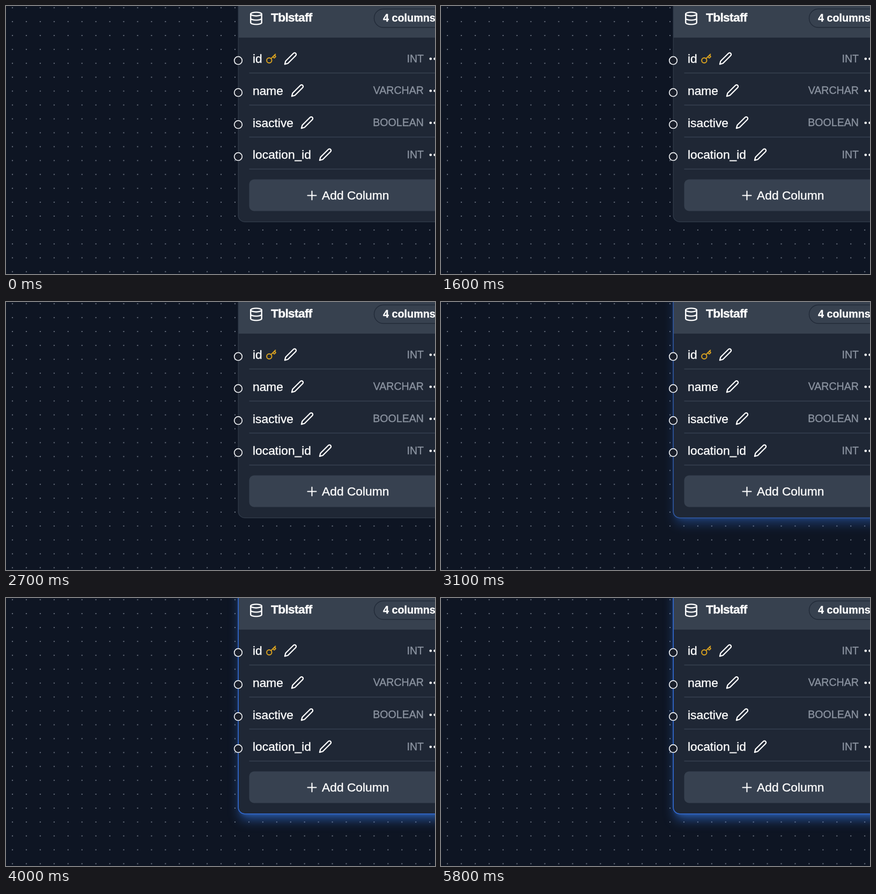
These frames come from a looping animation (800 by 500 pixels, 5900 ms). An HTML page:

```html
<!DOCTYPE html>
<html lang="en">
<head>
<meta charset="utf-8">
<title>Table card</title>
<style>
  html, body { margin: 0; width: 100%; height: 100%; overflow: hidden; background: #0e1523; }
  svg { display: block; }
  text { font: 22.8px "Liberation Sans", Arial, sans-serif; fill: #fff; stroke: #fff; stroke-width: .35; }
  .title { font-weight: 700; letter-spacing: -.7px; }
  .count { font-weight: 700; font-size: 19.8px; }
  .type { font-size: 19.6px; fill: #8b93a0; stroke: #8b93a0; text-anchor: end; }
  .icon { fill: none; stroke: #fff; stroke-width: 2.1; stroke-linecap: round; stroke-linejoin: round; }
  .line { stroke: #364050; stroke-width: 1.3; }
  .far { filter: blur(10.5px); }
  .near { filter: blur(4.2px); }
</style>
</head>
<body>
<svg width="800" height="500" viewBox="0 0 800 500">
  <defs>
    <pattern id="dots" x="-1" y="-9.8" width="25.94" height="25.92" patternUnits="userSpaceOnUse">
      <circle cx="13" cy="13" r="1.15" fill="#747c8a"/>
    </pattern>
    <clipPath id="clip"><rect x="433.2" y="-80" width="500" height="482.7" rx="12"/></clipPath>
    <path id="pencil" d="M17 3a2.85 2.83 0 1 1 4 4L7.5 20.5 2 22l1.5-5.5Z"/>
  </defs>
  <rect width="800" height="500" fill="url(#dots)"/>

  <g id="glow" fill="#3b82f6" opacity="0">
    <rect class="far" fill-opacity=".55" x="437" y="-62" width="492" height="475" rx="9"/>
    <rect class="near" fill-opacity=".5" x="438.5" y="-70" width="490" height="473" rx="8"/>
  </g>

  <g clip-path="url(#clip)">
    <rect x="433" y="-80" width="500" height="484" fill="#1f2735"/>
    <rect x="433" y="-80" width="500" height="139" fill="#37414f"/>
  </g>
  <rect x="433.2" y="-80" width="500" height="482.7" rx="12" fill="none" stroke="#323c4b" stroke-width="1.2"/>
  <rect id="edge" x="433.2" y="-80" width="500" height="482.7" rx="12" fill="none" stroke="#316ad4" stroke-width="1.6" opacity="0"/>

  <g class="icon" transform="translate(466.5 23) scale(1.14) translate(-12 -12)">
    <ellipse cx="12" cy="5" rx="9" ry="3"/>
    <path d="M3 5v14a9 3 0 0 0 18 0V5M3 12a9 3 0 0 0 18 0"/>
  </g>
  <text class="title" x="494" y="29.3">Tblstaff</text>
  <rect x="686.5" y="5.5" width="140" height="34.5" rx="17.25" fill="#37414f" stroke="#222b39" stroke-width="1.4"/>
  <text class="count" x="703" y="29.3">4 columns</text>

  <g id="rows"></g>

  <g class="icon" style="stroke:#dba320;stroke-width:2.3" transform="translate(494.7 98.5) scale(.855) translate(-12 -12)">
    <circle cx="7.5" cy="15.5" r="5.5"/>
    <path d="m15.5 7.5 2.3 2.3a1 1 0 0 0 1.4 0l2.1-2.1a1 1 0 0 0 0-1.4L19 4M21 2l-9.6 9.6"/>
  </g>

  <rect x="453.5" y="323.5" width="460" height="59" rx="9" fill="#374150"/>
  <path class="icon" d="M562.5 353.5h16m-8-8v16"/>
  <text x="589" y="360.6">Add Column</text>
</svg>
<script>
  const LOOP = 5900, STEP = 100;
  const byId = id => document.getElementById(id);

  // name, type, pencil centre
  const columns = [
    ['id', 'INT', 530.5],
    ['name', 'VARCHAR', 543.5],
    ['isactive', 'BOOLEAN', 561.5],
    ['location_id', 'INT', 595.5]
  ];
  byId('rows').innerHTML = columns.map(([name, type, penX], i) => {
    const y = 98 + i * 59.75;
    return `
      <text x="460" y="${y + 8.1}">${name}</text>
      <use href="#pencil" class="icon" transform="translate(${penX} ${y}) scale(1.06) translate(-12 -12)"/>
      <text class="type" x="779" y="${y + 6.6}">${type}</text>
      <g fill="#fff"><circle cx="791.8" cy="${y + .5}" r="2.3"/><circle cx="799.6" cy="${y + .5}" r="2.3"/></g>
      <path class="line" d="M453.5 ${y + 27}H800"/>
      <circle cx="433" cy="${y + 3.7}" r="7.3" fill="#1a1f2b" stroke="#eef0f3" stroke-width="1.7"/>`;
  }).join('');

  function draw(now) {
    const t = Math.floor(now % LOOP / STEP) * STEP;
    const u = Math.min(1, Math.max(0, (t - 3000) / 250));
    const select = 1 - (1 - u) ** 2;
    byId('glow').setAttribute('opacity', select);
    byId('edge').setAttribute('opacity', select);
  }

  const start = performance.now();
  function tick() {
    draw(performance.now() - start);
    requestAnimationFrame(tick);
  }
  tick();
</script>
</body>
</html>
```
